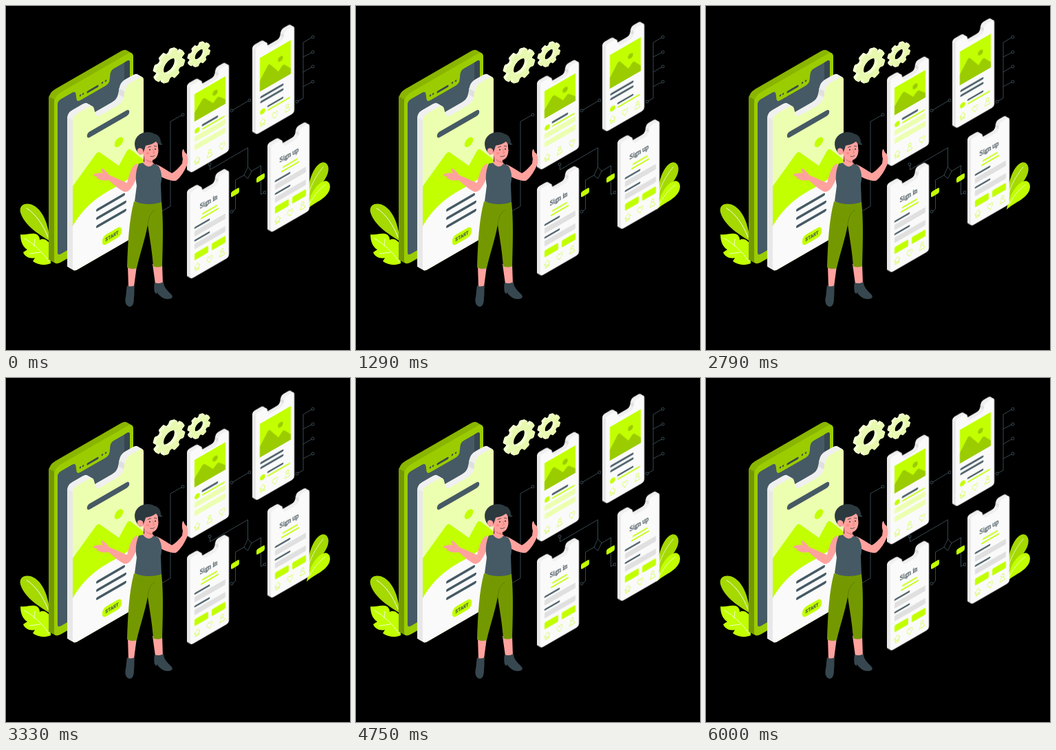
An HTML page for the animation above (6040 ms loop, 500x500 px).

```html
<!DOCTYPE html>
<html lang="en">
<head>
<meta charset="utf-8">
<title>App screens</title>
<style>
html, body { margin: 0; width: 100%; height: 100%; overflow: hidden; background: #000; }
svg { display: block; width: 100vw; height: 100vh; }
.serif { font: 10.4px "Liberation Serif", "Noto Serif", serif; stroke: #37474f; stroke-width: .3; }
.sans { font: bold 7.3px Roboto, "Liberation Sans", sans-serif; }
text { fill: #37474f; text-anchor: middle; }
</style>
</head>
<body>
<svg id="stage" viewBox="0 0 500 500"></svg>
<script>
const LIME = '#c2ff00', PALE = '#ecffb0', OLIVE = '#9bcc00', LEAF = '#a5d900', DARK = '#455a64',
      DEEP = '#37474f', SKIN = '#ffa29e', PANTS = '#749900', WHITE = '#fafafa';
const SLOPE = 0.577, LOOP = 6040, LIFT = 10;

// ---- helpers ----
const path = (d, fill, more = '') => `<path d="${d}" fill="${fill}" ${more}/>`;
const stroke = (d, color, w) =>
  path(d, 'none', `stroke="${color}" stroke-width="${w}" stroke-linecap="round" stroke-linejoin="round"`);
const rect = (x, y, w, h, fill, r = 0) =>
  `<rect x="${x}" y="${y}" width="${w}" height="${h}" rx="${r}" fill="${fill}"/>`;
const dot = (x, y, r, fill) => `<circle cx="${x}" cy="${y}" r="${r}" fill="${fill}"/>`;
const bar = (x1, x2, y, color, w) => stroke(`M${x1} ${y}H${x2}`, color, w);
const group = (t, body) => `<g transform="${t}">${body}</g>`;
const iso = (x, y, body) => group(`matrix(1 ${-SLOPE} 0 1 ${x} ${y})`, body);
const label = (x, y, cls, s) =>
  group(`translate(${x} ${y}) scale(.866 1)`, `<text class="${cls}">${s}</text>`);

// Closed polygon with rounded corners
function rounded(pts, r) {
  const n = pts.length;
  const toward = (a, b) => {
    const dx = b[0] - a[0], dy = b[1] - a[1], len = Math.hypot(dx, dy);
    const k = Math.min(r, len / 2) / len;
    return (a[0] + dx * k).toFixed(2) + ' ' + (a[1] + dy * k).toFixed(2);
  };
  return pts.map((p, i) =>
    (i ? 'L' : 'M') + toward(p, pts[(i + n - 1) % n]) + `Q${p[0]} ${p[1]} ` + toward(p, pts[(i + 1) % n])
  ).join('') + 'Z';
}

// Repeats a shape backwards to give it thickness
function extrude(d, depth, fill) {
  let out = '';
  for (let s = depth; s > 0; s -= 0.6)
    out += group(`translate(${-s} ${-2 * SLOPE * s})`, path(d, fill, 'fill-rule="evenodd"'));
  return out;
}

function wall(u, v1, v2, d, fill) {
  const b = 2 * SLOPE * d;
  return path(`M${u} ${v1}L${u - d} ${v1 - b}V${v2 - b}L${u} ${v2}Z`, fill);
}

const notched = (w, h, k) => rounded(
  [[0, 0], [16 * k, 0], [18.5 * k, 12 * k], [39.5 * k, 12 * k], [42 * k, 0], [w, 0], [w, h], [0, h]], 4 * k);

function slab(w, h, k, depth, face) {
  const d = notched(w, h, k);
  return extrude(d, depth, '#f0f0f0') + wall(0, 3 * k, h - 2 * k, depth, '#e8e8e8') +
    wall(40.8 * k, 4 * k, 9 * k, depth, '#e0e0e0') + path(d, face);
}

// ---- plants and gears ----
const leaves =
  path('M64 342C50 333 27 320 21 300C18 288 31 284 42 291C54 299 62 318 64 342Z', LEAF) +
  stroke('M30 294C43 302 54 318 61 336', '#fff', .9) +
  path('M65 374C56 378 46 376 39 371L42 366C34 368 27 364 25 358L31 354C25 351 21 343 21 332C29 333 35 330 42 331C47 332 49 336 49 340C54 337 60 340 64 346Z', LIME) +
  stroke('M27 338C39 345 53 357 62 371M41 349L42 339M50 358L34 360', '#fff', .8) +
  path('M436 287C438 262 444 237 456 229C464 224 471 231 468 242C464 257 448 268 436 287Z', LEAF) +
  stroke('M461 234C452 245 445 257 440 272', '#fff', .7) +
  path('M437 296C440 278 449 260 461 255C469 252 473 260 470 268C464 282 448 285 437 296Z', LIME) +
  stroke('M464 260C454 267 446 278 441 288', '#fff', .7);

function gear(x, y, r, depth) {
  const pts = [];
  for (let i = 0; i < 8; i++)
    for (const [a, q] of [[-.27, .77], [-.2, 1], [.2, 1], [.27, .77]]) {
      const t = (i + .4) * Math.PI / 4 + a;
      pts.push([r * q * Math.cos(t), r * q * Math.sin(t)]);
    }
  const h = r * .45;
  const d = rounded(pts, r * .08) + `M${h} 0A${h} ${h} 0 1 0 ${-h} 0A${h} ${h} 0 1 0 ${h} 0Z`;
  return iso(x, y, extrude(d, depth, '#f3ffd0') + path(d, '#e8f9b0', 'fill-rule="evenodd"'));
}
const gears = gear(239, 87.5, 22, 4) + gear(281.8, 71, 15.8, 3);

// ---- flow lines ----
const ring = (x, y) => `<circle cx="${x}" cy="${y}" r="2" fill="none" stroke="${DARK}" stroke-width=".8"/>`;
const tag = (x, y) => iso(x, y, rect(-6, -4, 12, 8, LIME, 2.2));
const flow =
  stroke('M255 159L239 168V291L227 298M330 151L352 138M425 138L432 134V53L444 46', DARK, .8) +
  stroke('M432 74L444 68M432 96L444 89M432 117L444 111', DARK, .8) +
  stroke('M296.500 232V238L351.500 206V234L357 240L351.500 251L346 246L351.500 234', DARK, .8) +
  stroke('M346 246L333.500 253V295L330 298M357 240L370.500 232V274L374 272', DARK, .8) +
  [[257, 158], [328, 152], [354, 137], [423, 139], [446, 45], [446, 67], [446, 88], [446, 110],
   [296, 230], [328, 299], [376, 271]].map(p => ring(...p)).join('') +
  tag(333, 271) + tag(370, 250);

// ---- phone and large screen ----
function phone() {
  const w = 115, h = 247;
  const frame = rounded([[0, 0], [w, 0], [w, h], [0, h]], 10);
  const screen = rounded([[5, 10], [31, 10], [33, 28], [80, 28], [82, 10], [110, 10], [110, 235], [5, 235]], 5);
  return iso(70, 131,
    extrude(frame, 8, '#8ab600') + wall(0, 5, h - 5, 8, PANTS) + path(frame, OLIVE) +
    path(screen, DARK) + path('M102 10H106Q110 10 110 14V235H102Z', DEEP) +
    bar(49, 63, 22, DEEP, 3.2) +
    [38, 42, 70, 75].map(u => dot(u, 21, 1.3, DEEP)).join(''));
}

function bigScreen() {
  const w = 103, h = 227, k = w / 56;
  const art =
    path('M0 102L33 75Q36 72 39 75L67 111L78 97Q81 93 84 97L103 123V180H0Z', LIME) +
    path('M0 160C14 144 30 138 58 139C78 140 92 137 103 131V227H0Z', WHITE) +
    dot(67, 76.5, 6.3, LIME);
  return iso(97, 160,
    slab(w, h, k, 8, PALE) +
    `<clipPath id="face"><path d="${notched(w, h, k)}"/></clipPath><g clip-path="url(#face)">${art}</g>` +
    bar(25, 78, 41, DARK, 8.5) +
    bar(36, 74, 157, DARK, 4) + bar(36, 76, 169, DARK, 4) + bar(36, 76, 181, DARK, 4) +
    rect(43, 200, 28, 14.5, LIME, 6) + label(57, 209.800, 'sans', 'START'));
}

// ---- small screens ----
const icons = {
  home: 'M-4.500 0L0 -5L4.500 0H3V5H1V2H-1V5H-3V0Z',
  heart: 'M0 4.500C-7 -1 -4 -5 -1.500 -4Q0 -3.500 0 -2Q0 -3.500 1.500 -4C4 -5 7 -1 0 4.500Z',
  user: 'M0 -5A2.300 2.300 0 1 1 0 -.4A2.300 2.300 0 1 1 0 -5M-1.500 0Q-4 2 -4 5H4Q4 2 1.500 0'
};
const menu = names => names.map((n, i) =>
  group(`translate(${10 + 18 * i} 115.500) scale(.9 1)`, stroke(icons[n], LIME, .65))).join('');

const picture = (v, h) => group(`translate(6 ${v})`,
  rect(0, 0, 45, h, LIME) +
  path(`M0 ${h * .68}L11 ${h * .37}Q13 ${h * .32} 15 ${h * .37}L27 ${h * .72}L32 ${h * .62}Q34 ${h * .58} 36 ${h * .62}L45 ${h * .84}V${h}H0Z`, OLIVE) +
  dot(30, h * .38, 3.7, OLIVE));

const post = picture(17, 40) + bar(18, 39, 69, DARK, 2.8) + dot(10, 72, 3.8, LIME) +
  bar(18, 49, 74.5, LIME, 2) + rect(6, 79, 45, 8, PALE, 1) + rect(6, 91, 45, 8, PALE, 1) +
  menu(['home', 'user', 'heart']);

const article = picture(20, 49) + bar(8, 39, 78, DARK, 3) + bar(8, 39, 85, DARK, 3) +
  bar(18, 39, 97, DARK, 2.6) + dot(10, 100, 3.8, LIME) + bar(18, 49, 102.5, LIME, 2) +
  menu(['home', 'heart', 'user']);

const form = title => label(26.5, 34, 'serif', title) +
  bar(18, 38, 43.5, LIME, 2.2) + bar(16, 40, 49, LIME, 2.2) +
  [57.5, 76].map(v => bar(7, 27, v, DARK, 2.6) + rect(6, v + 4.5, 45, 8, '#e0e0e0', 1)).join('') +
  rect(6, 94.5, 20, 10, LIME, 1.5) + rect(31, 94.5, 20, 10, LIME, 1.5) +
  menu(['home', 'heart', 'user']);

const sheet = group('translate(0 2)', slab(56, 126.5, 1, 5, WHITE));
const screens = [[268, 114.5, post], [363, 59, article], [268, 268.8, form('Sign in')], [385, 201, form('Sign up')]]
  .map(([x, y, body]) => iso(x, y, sheet + body)).join('');

// ---- woman ----
const woman =
  // ankles and boots
  path('M177 377L190 378L186 408H178Z', SKIN) + path('M213 375H227L228 404H217Z', SKIN) +
  path('M176 406C179 408 183 408 187 406C186 413 187 418 186 424C186 432 184 437 180 437C175 437 172 430 174 423C175 417 175 411 176 406Z', DEEP) +
  path('M216 402C220 404 225 403 229 401C229 408 234 413 240 419C244 423 241 426 235 426C228 426 223 421 219 416V419L216 416C215 411 215 406 216 402Z', DEEP) +
  // trousers
  path('M186 284C198 288 215 288 226 284C229 312 228 345 227 378C223 380 218 380 214 378C212 352 208 333 206 318C202 340 194 362 190 381C185 383 180 382 176 380C177 345 179 310 186 284Z', PANTS) +
  stroke('M206 318C207 309 209 301 216 297', '#5c7a00', .9) +
  // arms
  path('M191 229C183 231 180 242 176 257C168 254 158 249 150 246C147 241 142 237 139 236C138 238 140 241 141 243C136 242 131 243 127 245C127 247 130 248 133 248C131 249 131 251 134 251C138 254 144 254 149 253C157 260 165 267 172 270C180 271 184 262 190 250Z', SKIN) +
  path('M218 230C226 233 234 239 241 243C247 240 252 234 256 229L257 222C255 215 256 208 258 208L260 213C264 214 265 222 264 229C260 239 254 249 247 254C239 255 229 250 221 246Z', SKIN) +
  // neck and top
  path('M200 214H213V227L217 231C213 238 203 238 197 229L201 226Z', SKIN) +
  path('M193 229C190 236 187 247 190 261L187 284C198 289 215 289 226 285L225 259C228 247 225 237 221 232L214 229C211 235 204 235 199 228Z', DARK) +
  // head
  path('M198 200C198 212 200 224 209 224.500C217 225 221.500 218 221.500 210L220 193Z', SKIN) +
  path('M201 220C204 224 209 226 213 225L213 228C208 228 203 225 201 220Z', '#e98480') +
  path('M195 216C188 211 184 199 190 191C195 183 209 181 216 186C222 187 225 193 225 198C226 200 227 201 228 201C224 204 220 200 218 197C213 201 207 202 203 203C202 206 201 210 199 214Z', '#2c393f') +
  path('M199 209C196 205 191 206 191 210C191 215 196 217 200 215Z', SKIN) +
  dot(209, 209, 1, '#263238') + dot(217, 208, 1, '#263238') +
  stroke('M206.500 205.500L210.500 204M215.500 203.500L219 204', '#263238', .8) +
  stroke('M213.500 208L215.500 213.500L213 214', '#e06f6c', .7) +
  stroke('M210 218.500Q213 220 216 217.500', '#263238', .7) +
  dot(206, 214, 2, '#ff8984');

const stage = document.getElementById('stage');
stage.innerHTML = leaves + gears + flow + phone() + bigScreen() +
  `<g id="float">${screens}</g>` + woman;

document.getElementById('float').animate(
  [0, -LIFT, 0].map(y => ({ transform: `translate(0px, ${y}px)` })),
  { duration: LOOP, iterations: Infinity, easing: 'linear' });
</script>
</body>
</html>
```
